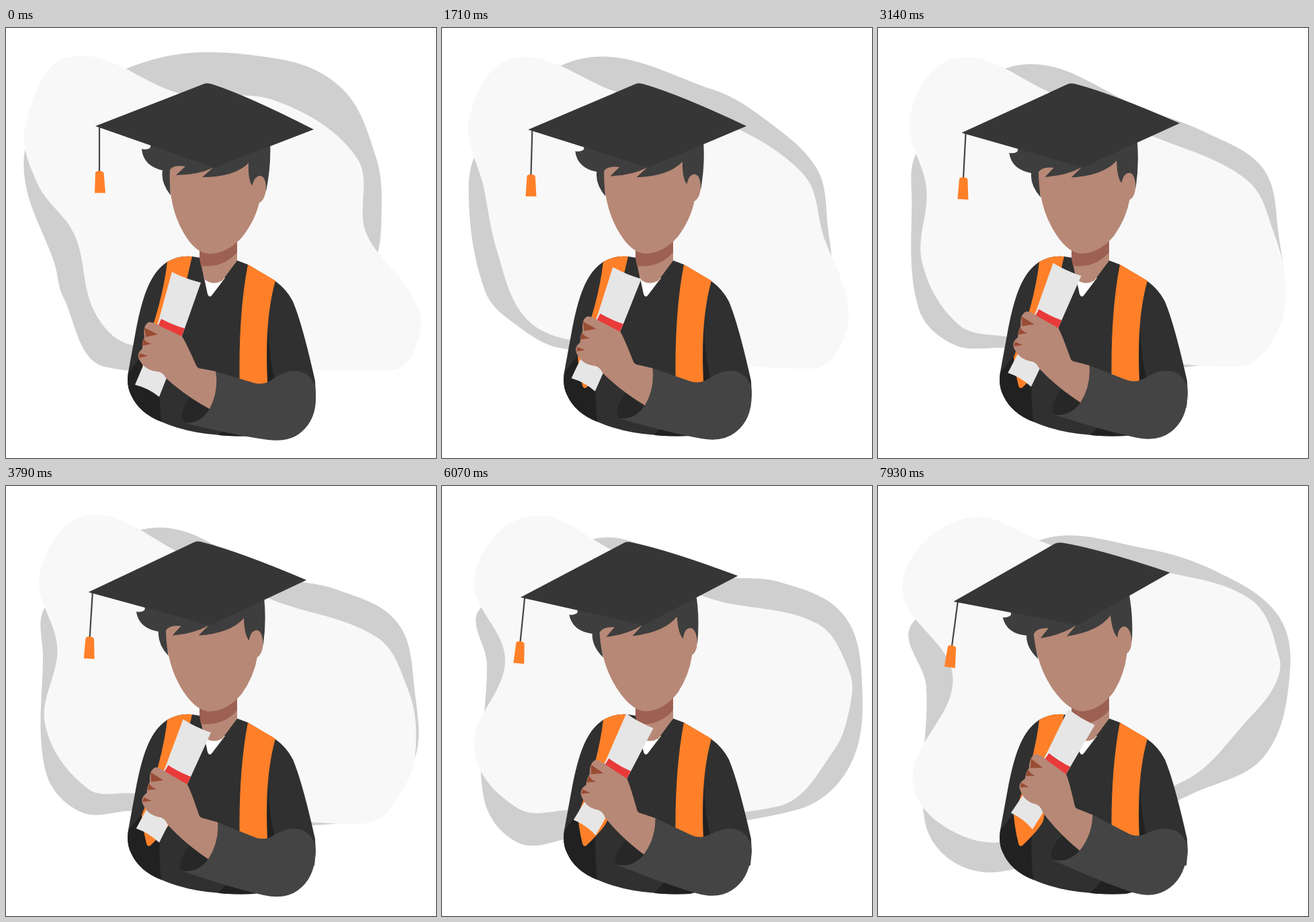
Write an HTML page that moves like this. It is 640 px wide and 640 px high and loops after 8 s.

```html
<!DOCTYPE html>
<html lang="en">
<head>
<meta charset="utf-8">
<title>Graduate</title>
<style>
  html, body { margin: 0; width: 100%; height: 100%; overflow: hidden; background: #fff; }
  svg { display: block; width: 100%; height: 100%; }
</style>
</head>
<body>
<svg viewBox="0 0 640 640">
  <path id="backBlob" fill="#cfcfcf"/>
  <path id="frontBlob" fill="#f8f8f8"/>

  <!-- gown -->
  <path fill="#303030" d="M240 348Q257 338 277 340L289 342L303 398L344 346L360 352L400 376Q418 389 427 407Q441 440 460 525L461 545L425 590L370 607Q345 609 319 606Q270 603 231 586Q198 573 186 546Q179 532 182 512L193 452C203 400 214 365 240 348Z"/>
  <path fill="#212121" d="M182 513L200 490L229 505Q227 550 231 586Q198 573 186 546Q179 532 182 513Z"/>
  <path fill="#212121" d="M316 606L334 586L392 600L378 605Q346 609 316 606Z"/>
  <path fill="#212121" d="M390 442Q391 490 402 532H388Z"/>
  <path fill="#ff8029" d="M360 352L401 376Q383 440 390 540H348Q345 430 360 352Z"/>
  <path fill="#ff8029" d="M240 348Q257 338 277 340Q259 415 246 498Q242 509 215 535Q211 538 209 532Q204 512 202 490Q233 410 240 348Z"/>

  <!-- collar and neck -->
  <path fill="#fff" d="M294 368L300 396Q303 403 307 397L326 372Z"/>
  <path fill="#b78876" d="M288 325L344 305V346L322 376Q308 384 295 374L288 341Z"/>
  <path fill="#9d6152" d="M288 325L344 305V334Q322 358 290 354L288 341Z"/>

  <g id="head">
    <path fill="#b78876" d="M242 200L361 190L368 225L378 255Q372 286 350 313Q328 336 302 336Q282 335 265 306Q249 279 245 245L241 220Z"/>
    <path fill="#3e3e3e" d="M202 180Q208 182 214 179Q217 174 213 170L393 168Q395 205 387 243L367 235Q360 228 361 201Q340 222 292 222L308 208Q285 219 253 219L267 206Q250 203 244 211Q243 228 245 249Q230 230 233 212Q204 205 202 180Z"/>
    <path fill="#b78876" d="M366 237Q369 220 379 220Q387 222 387 240Q385 258 375 261Z"/>
    <g id="tassel">
      <path stroke="#444" stroke-width="2.2" d="M139 147V215"/>
      <path fill="#ff8029" d="M133 216Q133 213 139 212.500Q145 213 145.500 216L148 245.500H132Z"/>
    </g>
    <path fill="#363636" d="M133 146L295 83Q300 81 308 84Q360 101 458 151L310 208Z"/>
  </g>

  <path fill="#444" d="M437 511Q460 518 461 545L459 565L400 560Z"/>
  <g id="arm">
    <path fill="#e6e6e6" d="M247 363Q266 373 290 379L266 447L239 521L228 549Q212 536 192 531L206 498L227 436Z"/>
    <path fill="#e93a3a" d="M231 433Q248 442 266 447L261 460L226 444Z"/>
    <path fill="#272727" d="M303 567Q288 589 268 588Q258 584 264 567Q268 556 277 545Z"/>
    <path fill="#444" d="M312 511L368 528Q384 533 398 522Q419 507 437 511Q460 518 461 545Q463 581 440 601Q422 617 390 613Q345 607 265 588Q290 589 303 567Z"/>
    <path fill="#b78876" d="M212 438Q219 437 230 444L262 459Q268 468 283 502Q285 507 291 507L312 511Q317 540 303 567Q266 547 238 521Q233 511 223 511Q206 509 198 493Q194 485 203 477Q202 468 206 460Q203 443 212 438Z"/>
    <path fill="#994c34" d="M206 446L226 456L208 460ZM205 462Q208 468 217 470L203 473ZM199 484L211 488L198 491Z"/>
  </g>
</svg>
<script>
const LOOP = 8000;
const poseTimes = [0, 2300, 5000, LOOP];

// Each blob: a few outline points per pose, clockwise.
const frontPoses = [
  '265,99 400,108 522,193 536,305 602,394 617,450 575,509 188,472 132,423 102,308 47,232 29,145 95,43',
  '262,95 400,140 543,226 580,315 602,402 592,465 545,506 190,461 118,430 75,340 67,238 45,130 112,45',
  '257,103 385,190 560,225 612,290 617,345 600,422 525,499 193,455 125,467 45,368 84,245 55,128 130,43',
  '260,88 410,122 555,168 597,255 590,295 553,342 455,437 190,531 90,502 52,432 112,285 36,148 130,48'
].map(parsePoints);
const backPoses = [
  '215,48 400,45 500,90 550,190 559,270 545,355 450,470 150,505 85,400 72,350 28,225 45,150',
  '200,46 405,108 480,156 560,215 578,290 580,400 460,502 188,467 115,453 62,407 44,265 62,185',
  '228,76 395,156 500,152 600,193 632,310 625,425 560,497 190,497 110,512 57,440 64,245 60,170',
  '243,80 400,92 500,125 592,188 613,270 575,400 470,455 205,571 120,565 70,500 72,300 51,205'
].map(parsePoints);

function parsePoints(text) {
  return text.split(' ').map(pair => pair.split(',').map(Number));
}

function blend(poses, t) {
  const next = poseTimes.findIndex(time => time > t);
  const start = poseTimes[next - 1];
  const p = (t - start) / (poseTimes[next] - start);
  return poses[next - 1].map((point, i) =>
    point.map((v, axis) => v + (poses[next][i][axis] - v) * p));
}

// Closed smooth curve: handles point along the neighbours, sized by each segment.
function smoothPath(points) {
  const at = i => points[(i + points.length) % points.length];
  const between = (a, b) => [b[0] - a[0], b[1] - a[1]];
  const handle = (i, length) => {
    const [dx, dy] = between(at(i - 1), at(i + 1));
    const k = length / Math.hypot(dx, dy);
    return [at(i)[0] + dx * k, at(i)[1] + dy * k];
  };
  const curves = points.map((point, i) => {
    const reach = 0.35 * Math.hypot(...between(point, at(i + 1)));
    return `C${handle(i, reach)} ${handle(i + 1, -reach)} ${at(i + 1)}`;
  });
  return `M${points[0]}${curves.join('')}Z`;
}

const el = id => document.getElementById(id);
const rotate = (id, angle, x, y) => el(id).setAttribute('transform', `rotate(${angle} ${x} ${y})`);
const shape = (id, poses, t) => el(id).setAttribute('d', smoothPath(blend(poses, t)));

function draw() {
  const t = performance.now() % LOOP;
  const seconds = t / 1000;
  shape('backBlob', backPoses, t);
  shape('frontBlob', frontPoses, t);
  rotate('head', -1.07 * seconds, 298, 298);
  rotate('tassel', 2.02 * seconds, 139, 148);
  rotate('arm', 1.36 * seconds, 430, 540);
  requestAnimationFrame(draw);
}
draw();
</script>
</body>
</html>
```
